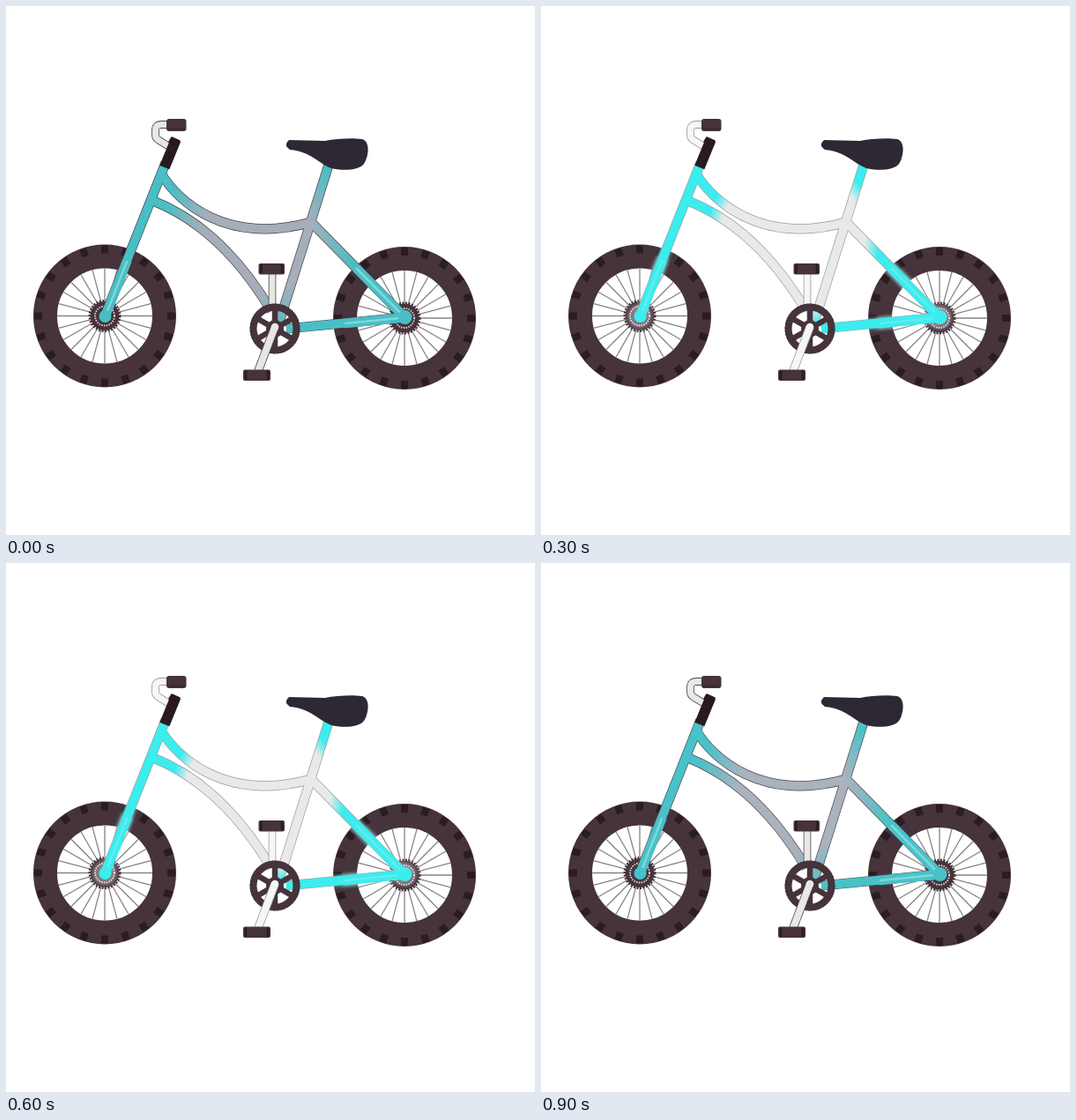
Recreate the animation shown at these times as an HTML page. Size 600 by 600 pixels, loop 1000 ms.

```html
<!DOCTYPE html>
<html lang="en">
<head>
<meta charset="utf-8">
<title>Glowing bicycle</title>
<style>
html, body { margin: 0; width: 100%; height: 100%; overflow: hidden; background: #fff; }
svg { display: block; width: 100vw; height: 100vh; }
</style>
</head>
<body>
<svg viewBox="0 0 600 600">
  <defs>
    <radialGradient id="paint" gradientUnits="userSpaceOnUse" cx="285" cy="265" r="200">
      <stop id="inner"/><stop id="outer"/>
    </radialGradient>
    <filter id="soft" filterUnits="userSpaceOnUse" x="0" y="0" width="600" height="600">
      <feGaussianBlur stdDeviation="2"/>
    </filter>
    <clipPath id="tyres">
      <path id="tyreArea" clip-rule="evenodd"/>
    </clipPath>
    <g id="tubes" fill="none" stroke-linejoin="round">
      <path d="M181 178L112 352"/>
      <path d="M176 190C195 222 250 272 347 245"/>
      <path d="M167 221Q245 252 301 346"/>
      <path d="M366 180L345 247L310 358"/>
      <path d="M346 245L452 353L318 366"/>
    </g>
    <g id="stays" fill="none" stroke-linecap="round">
      <path d="M137 290L113 351M398 298L451 352M385 360L451 353.500"/>
    </g>
    <path id="bar" d="M184 134.500H176Q169.500 134.500 169.500 141V146Q169.500 150 173 152L186 160" fill="none"/>
    <path id="upperArm" d="M302 304V342"/>
    <path id="lowerArm" d="M305 364L286 414"/>
  </defs>

  <g id="wheels"></g>
  <g clip-path="url(#tyres)">
    <use id="halo" href="#tubes" stroke="url(#paint)" stroke-width="12" filter="url(#soft)"/>
  </g>
  <g id="mist" filter="url(#soft)">
    <use href="#stays" stroke="#e8ffff" stroke-width="13"/>
    <g fill="#fff" opacity=".7"><circle cx="112" cy="352" r="14"/><circle cx="452" cy="353" r="14"/></g>
  </g>

  <use class="edge" href="#tubes" stroke-width="11.200"/>
  <use href="#tubes" stroke="url(#paint)" stroke-width="9.800"/>
  <use href="#stays" stroke="url(#paint)" stroke-width="10.500"/>
  <use id="shine" href="#stays" stroke="#a5e8ee" stroke-width="2.500"/>
  <g fill="url(#paint)"><circle cx="112.500" cy="352" r="7"/><circle cx="452.500" cy="353" r="8"/></g>

  <use class="edge" href="#bar" stroke-width="8.800"/>
  <use class="metal" href="#bar" stroke-width="7.200"/>
  <rect x="182" y="128" width="22.500" height="14" rx="3" fill="#46333b"/>
  <path d="M183 139.500H203" stroke="#382830" stroke-width="2"/>
  <path d="M192.500 152L179.800 183" stroke="#2a1a20" stroke-width="12"/>
  <path d="M188 149L197 153L195 158L185 154Z" fill="#2a1a20" stroke="#2a1a20" stroke-width="1.500" stroke-linejoin="round"/>
  <path d="M321 152L362 153C375 150 394 149.500 404 151C414 154 411 172 406 179C400 187 380 187 369 184C355 179 346 165 322 163Q314 158 321 152Z" fill="#2d2833"/>

  <use class="edge" href="#upperArm" stroke-width="8.600"/>
  <use class="metal" href="#upperArm" stroke-width="7"/>
  <g id="ring"></g>
  <use class="edge" href="#lowerArm" stroke-width="9.600"/>
  <use class="metal" href="#lowerArm" stroke-width="8"/>
  <circle class="dot" cx="305" cy="364" r="4.300"/>
  <g id="pedals"></g>
</svg>
<script>
const $ = id => document.getElementById(id);
const DARK = '#46333b', DEEP = '#2b1b22';

const repeat = (n, make) => Array.from({ length: n }, (_, i) => make(i * 360 / n)).join('');

function wheel(x, y) {
  const treads = repeat(20, a =>
    `<rect x="71" y="-4" width="9" height="8" fill="${DEEP}" transform="rotate(${a})"/>`);
  const spokes = repeat(24, a =>
    `<path d="M17 0H54" stroke="#868386" stroke-width="1.300" transform="rotate(${a})"/>`);
  return `<g transform="translate(${x} ${y})">
    <circle r="67.500" fill="none" stroke="${DARK}" stroke-width="27"/>${treads}${spokes}
    <circle r="16.500" fill="${DARK}"/>
    <circle r="17" fill="none" stroke="${DARK}" stroke-width="3" stroke-dasharray="2 1.500"/>
    <circle r="11" fill="none" stroke="#ddd" stroke-width="1.800" stroke-dasharray="1.500 1.300"/>
  </g>`;
}

function pedal(x, y, w) {
  return `<rect x="${x}" y="${y}" width="${w}" height="12.500" rx="2" fill="${DARK}"/>
    <path d="M${x + 3} ${y + 1}v10M${x + w - 3} ${y + 1}v10" stroke="${DEEP}" stroke-width="2.500"/>`;
}

const disc = (x, y, r) => `M${x - r} ${y}a${r} ${r} 0 1 0 ${2 * r} 0a${r} ${r} 0 1 0 ${-2 * r} 0Z`;
const hubs = [[112, 351.5], [452, 354]];
$('wheels').innerHTML = hubs.map(([x, y]) => wheel(x, y)).join('');
$('tyreArea').setAttribute('d', hubs.map(([x, y]) => disc(x, y, 81) + disc(x, y, 54)).join(''));
$('ring').innerHTML = `<g transform="translate(305 366)" stroke="${DARK}" fill="none">
  <circle r="24.500" stroke-width="8"/><circle r="9.500" fill="${DARK}"/>
  ${repeat(6, a => `<path d="M6 0H23" stroke-width="6.500" transform="rotate(${a + 30})"/>`)}
  <circle r="28" stroke-width="1" stroke-dasharray="2 2"/></g>`;
$('pedals').innerHTML = pedal(286.5, 292, 29.5) + pedal(269, 412.5, 31);

// Looks from resting to full glow.
const looks = [
  { grey: [166, 174, 186], teal: [73, 190, 196], metal: [230, 230, 227], edge: [70, 65, 72], from: 62, to: 112, glow: 0 },
  { grey: [207, 209, 217], teal: [64, 229, 232], metal: [252, 252, 252], edge: [125, 123, 128], from: 72, to: 105, glow: .4 },
  { grey: [231, 231, 231], teal: [63, 234, 235], metal: [245, 245, 245], edge: [150, 150, 150], from: 80, to: 101, glow: .65 },
  { grey: [235, 235, 235], teal: [54, 240, 240], metal: [246, 246, 246], edge: [160, 160, 160], from: 85, to: 96, glow: .9 }
];
const levels = [0, 1, 2, 2.5, 3, 3, 2.5, 2, 1, .1];

function draw(ms) {
  const level = levels[Math.floor(ms % 1000 / 100)];
  const i = Math.min(2, Math.floor(level)), a = looks[i], b = looks[i + 1];
  const mix = (p, q) => p + (q - p) * (level - i);
  const num = key => mix(a[key], b[key]);
  const rgb = key => `rgb(${a[key].map((v, k) => Math.round(mix(v, b[key][k])))})`;

  $('inner').setAttribute('offset', num('from') / 200);
  $('inner').setAttribute('stop-color', rgb('grey'));
  $('outer').setAttribute('offset', num('to') / 200);
  $('outer').setAttribute('stop-color', rgb('teal'));
  $('halo').setAttribute('opacity', num('glow'));
  $('mist').setAttribute('opacity', num('glow') * .6);
  $('shine').setAttribute('opacity', .6 - num('glow') * .3);
  document.querySelectorAll('.edge').forEach(el => el.setAttribute('stroke', rgb('edge')));
  document.querySelectorAll('.metal').forEach(el => el.setAttribute('stroke', rgb('metal')));
  document.querySelector('.dot').setAttribute('fill', rgb('metal'));
}

const start = performance.now();
function tick() {
  draw(performance.now() - start);
  requestAnimationFrame(tick);
}
tick();
</script>
</body>
</html>
```
